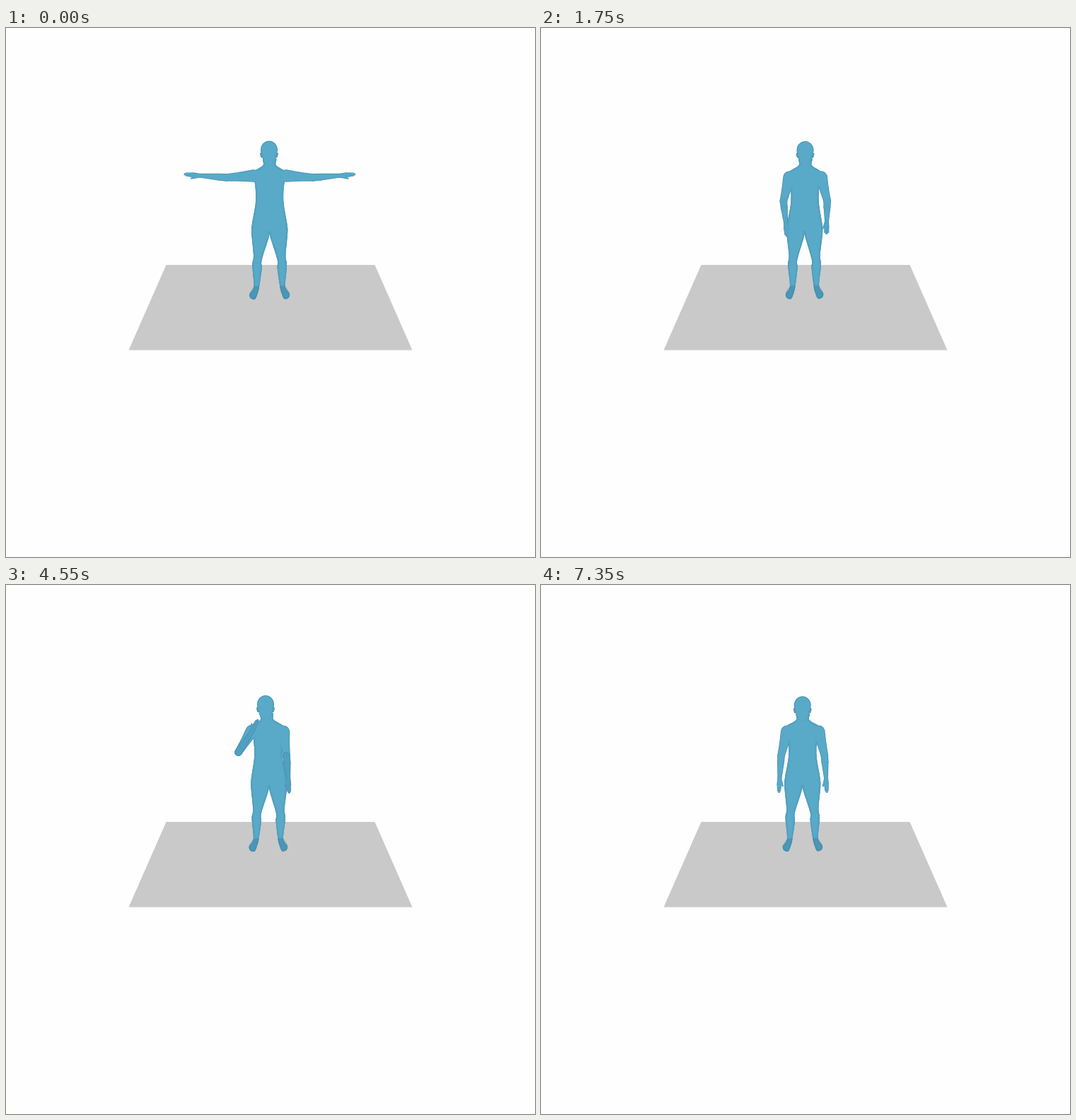
An HTML page with a canvas for the animation above (7.4 s loop, 748x748 px).

```html
<!DOCTYPE html>
<html lang="en">
<head>
<meta charset="utf-8">
<title>Figure</title>
<style>
html, body { margin: 0; width: 100%; height: 100%; overflow: hidden; background: #fefefe; }
canvas { display: block; width: 748px; height: 748px; }
</style>
</head>
<body>
<canvas id="stage" width="748" height="748"></canvas>
<script>
const ctx = document.getElementById('stage').getContext('2d');
const LOOP = 7400, STEP = 50;
const BASE = '#59a9c8', EDGE = '#468fae', NEAR = '#52a0bf', SHADE = 'rgba(51,120,154,.36)';
const UPPER = 39, FORE = 36, HAND = 25, SQUASH = .88;

// Half outline from neck to crotch; the other half is its mirror image.
const half = [
  [364, 184], [363.5, 194], [351, 202.5], [348.5, 210], [352, 220], [353, 246],
  [347.8, 278], [347.3, 291], [350, 322], [348.3, 336], [350.5, 366],
  [344.5, 376], [346, 382], [352, 383.5], [355.5, 376],
  [358, 366], [361.7, 340], [361.7, 328], [371, 298], [372.7, 290]
];
const mirror = pts => pts.map(([x, y]) => [745.4 - x, y]).reverse();
const outline = half.concat(mirror(half));
const footL = half.slice(10, 16), footR = mirror(footL);

// Arm poses: upper arm angle from hanging, forearm direction (outward, down).
const POSE = {
  spread: [86, 1, -.08],
  swing: [42, .72, .7],
  lower: [18, .52, .86],
  hang: [12, .06, 1],
  fold: [15, -.36, .49],
  tuck: [16, -.14, .3],
  lift: [23, -.36, -.36],
  chin: [29, -.5, -.86],
  close: [6, .07, 1]
};
const opening = { 0: 'spread', 750: 'swing', 1000: 'lower', 1500: 'hang' };
const leftPlan = { ...opening, 2500: 'fold', 3450: 'lift', 4550: 'chin', 6050: 'fold', 7350: 'hang' };
const rightPlan = { ...opening, 2500: 'tuck', 3450: 'hang', 4550: 'close', 5300: 'hang', 7350: 'hang' };

// Monotone cubic between poses.
function poseAt(plan, t) {
  const times = Object.keys(plan).map(Number), last = times.length - 1;
  let i = 0;
  while (i < last - 1 && t >= times[i + 1]) i++;
  const gap = times[i + 1] - times[i], u = (t - times[i]) / gap;
  const value = (k, c) => POSE[plan[times[k]]][c];
  return [0, 1, 2].map(c => {
    const slope = k => (value(k + 1, c) - value(k, c)) / (times[k + 1] - times[k]);
    const tangent = k => {
      const p = slope(Math.max(0, k - 1)), q = slope(Math.min(last - 1, k));
      return p * q <= 0 ? 0 : 2 * p * q / (p + q);
    };
    const ease = u * u * (3 - 2 * u);
    return value(i, c) * (1 - ease) + value(i + 1, c) * ease +
      gap * u * (1 - u) * (tangent(i) * (1 - u) - tangent(i + 1) * u);
  });
}

const ramp = (a, b, t) => {
  const u = Math.max(0, Math.min(1, (t - a) / (b - a)));
  return u * u * (3 - 2 * u);
};
const mix = (a, b, u) => a.map((v, i) => v + (b[i] - v) * u);

// The figure drifts back while the head sways and the feet shuffle.
function drift(t) {
  const back = ramp(1000, 6000, t), rise = ramp(4700, 6000, t), end = ramp(6200, 7300, t);
  const head = [
    1.5 * ramp(0, 1000, t) - 6.5 * ramp(2400, 4200, t) + 2.7 * rise,
    .7 * ramp(0, 1000, t) - 4.2 * ramp(1300, 4300, t) + 1.3 * rise
  ];
  const hip = [-3 * ramp(3800, 6000, t), -5 * back];
  const footY = 1.5 * end - 8.5 * back;
  return {
    head, hip, chest: mix(head, hip, .5),
    left: [2 * ramp(0, 2500, t) - 7 * ramp(3500, 6000, t) + 2.5 * end, footY],
    right: [-3 * ramp(0, 3000, t), footY - .5]
  };
}

// Moves a point by the shifts of the parts above and below it.
function warp([x, y], d) {
  const foot = x < 372.7 ? d.left : d.right;
  const stops = [[180, d.head], [200, d.chest], [290, d.hip], [372, foot]];
  let i = 0;
  while (i < 2 && y > stops[i + 1][0]) i++;
  const [y0, a] = stops[i], [y1, b] = stops[i + 1];
  const [dx, dy] = mix(a, b, Math.max(0, Math.min(1, (y - y0) / (y1 - y0))));
  return [x + dx, y + dy];
}

function smooth(pts) {
  const n = pts.length, path = new Path2D(), at = i => pts[(i + n) % n];
  path.moveTo(...pts[0]);
  for (let i = 0; i < n; i++) {
    const [a, b, c, d] = [at(i - 1), at(i), at(i + 1), at(i + 2)];
    path.bezierCurveTo(b[0] + (c[0] - a[0]) / 6, b[1] + (c[1] - a[1]) / 6,
      c[0] - (d[0] - b[0]) / 6, c[1] - (d[1] - b[1]) / 6, c[0], c[1]);
  }
  path.closePath();
  return path;
}

function taper([x0, y0], r0, [x1, y1], r1) {
  const ang = Math.atan2(y1 - y0, x1 - x0), len = Math.hypot(x1 - x0, y1 - y0) || 1;
  const lean = Math.acos(Math.max(-1, Math.min(1, (r0 - r1) / len)));
  ctx.beginPath();
  ctx.arc(x0, y0, r0, ang + lean, ang - lean + 2 * Math.PI);
  ctx.arc(x1, y1, r1, ang - lean, ang + lean);
  ctx.fill();
}

// Joints of one arm; side is -1 on the left, 1 on the right.
function solve(plan, side, t, chest) {
  const [deg, fx, fy] = poseAt(plan, t), a = deg * Math.PI / 180;
  const step = ([x, y], len, dx, dy) => [x + side * len * dx, y + SQUASH * len * dy];
  const shoulder = [372.9 + side * 22.5 + chest[0], 211.5 - 2.5 * Math.sin(a) + chest[1]];
  const elbow = step(shoulder, UPPER, Math.sin(a), Math.cos(a));
  const wrist = step(elbow, FORE, fx, fy);
  const reach = Math.max(.5, Math.hypot(fx, fy)) / Math.hypot(fx, fy * 1.3);
  return { side, shoulder, elbow, wrist, tip: step(wrist, HAND * reach, fx, fy * 1.3) };
}

function drawHand({ side, wrist, tip }, cut) {
  const dx = tip[0] - wrist[0], dy = tip[1] - wrist[1], len = Math.hypot(dx, dy);
  const nx = -side * dy / len, ny = side * dx / len;
  const fan = 1.7 + Math.max(0, 22 - len) * .35;
  const at = (f, o) => [wrist[0] + dx * f + nx * o, wrist[1] + dy * f + ny * o];
  taper(wrist, 3 - cut, at(.4, 0), 3.5 - cut);
  for (let o = -1; o <= 1; o += 2 / 3) {
    taper(at(.4, o * 2.1), 1.4 - cut / 2, at(.97 - .14 * Math.abs(o), o * fan), .9 - cut / 2);
  }
  taper(at(.15, 2), 1.5 - cut / 2, at(.52, 5), 1 - cut / 2);
}

function drawForearm(arm, cut) {
  const belly = mix(arm.elbow, arm.wrist, .3);
  taper(arm.elbow, 5.3 - cut, belly, 5 - cut);
  taper(belly, 5 - cut, arm.wrist, 3 - cut);
  drawHand(arm, cut);
}

function drawArm(arm, cut) {
  const mid = mix(arm.shoulder, arm.elbow, .5);
  taper(arm.shoulder, 8.8 - cut, mid, 6.6 - cut);
  taper(mid, 6.6 - cut, arm.elbow, 5.3 - cut);
  drawForearm(arm, cut);
}

function drawHead([dx, dy], cut) {
  const x = 372 + dx, y = 172.5 + dy;
  ctx.beginPath();
  ctx.ellipse(x, y, 12 - cut, 13 - cut, 0, 0, 2 * Math.PI);
  ctx.fill();
  taper([x, y + 4], 11 - cut, [x, y + 15], 8 - cut);
  for (const s of [-1, 1]) taper([x + s * 11.2, y + 5.5], 1.8 - cut, [x + s * 10.4, y + 9.5], 1.4 - cut);
}

function rim(path, width, alpha) {
  ctx.save();
  ctx.clip(path);
  ctx.globalAlpha = alpha;
  ctx.strokeStyle = EDGE;
  ctx.lineWidth = width;
  ctx.stroke(path);
  ctx.restore();
}

function drawFloor() {
  ctx.fillStyle = '#c9c9c9';
  ctx.beginPath();
  ctx.moveTo(226.5, 335);
  ctx.lineTo(521.5, 335);
  ctx.lineTo(574.5, 455.5);
  ctx.lineTo(173.5, 455.5);
  ctx.fill();
}

function draw(t) {
  ctx.fillStyle = '#fefefe';
  ctx.fillRect(0, 0, 748, 748);
  drawFloor();

  const d = drift(t);
  const shape = pts => smooth(pts.map(p => warp(p, d)));
  const body = shape(outline);
  const arms = [solve(leftPlan, -1, t, d.chest), solve(rightPlan, 1, t, d.chest)];

  // Dark silhouette first, slightly smaller light fill on top.
  ctx.fillStyle = EDGE;
  ctx.fill(body);
  drawHead(d.head, 0);
  arms.forEach(a => drawArm(a, 0));

  ctx.fillStyle = BASE;
  ctx.fill(body);
  rim(body, 5, .2);
  rim(body, 2, .4);
  arms.forEach(a => drawArm(a, .8));
  ctx.fillStyle = NEAR;
  drawHead(d.head, .8);
  ctx.fillStyle = BASE;
  drawHead(d.head, 2.2 - .9);

  ctx.fillStyle = SHADE;
  for (const foot of [footL, footR]) ctx.fill(shape(foot));

  // Forearms passing in front of the trunk.
  ctx.globalAlpha = ramp(1700, 2300, t) * (1 - ramp(6200, 6900, t));
  for (const a of arms) {
    ctx.fillStyle = EDGE;
    drawForearm(a, 0);
    ctx.fillStyle = NEAR;
    drawForearm(a, .8);
  }
  ctx.globalAlpha = 1;
}

let start = null;
function tick(now) {
  if (start === null) start = now;
  draw(Math.floor(((now - start) % LOOP) / STEP) * STEP);
  requestAnimationFrame(tick);
}
draw(0);
requestAnimationFrame(tick);
</script>
</body>
</html>
```
